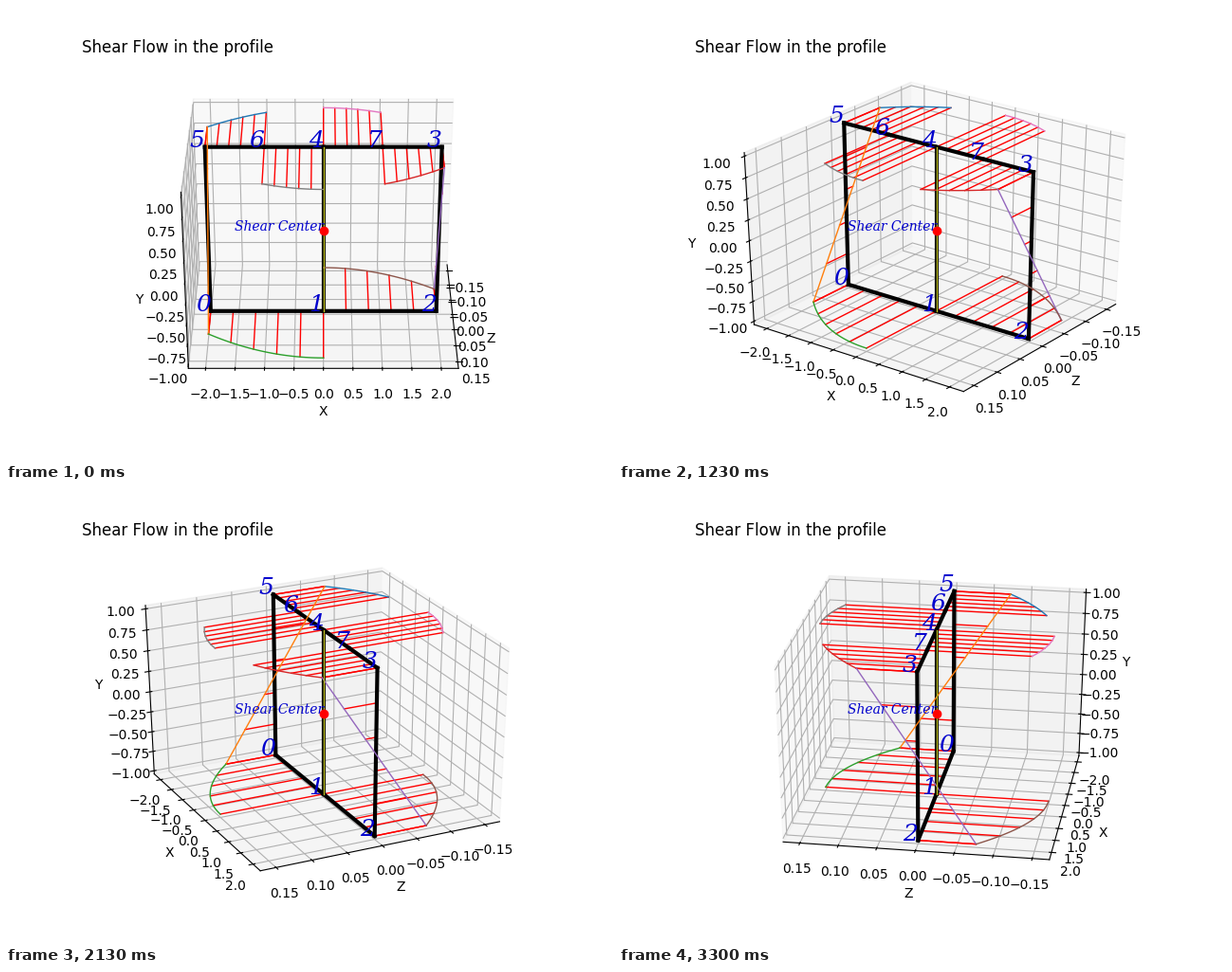
These frames come from a looping animation (640x480 px, 3330 ms). A matplotlib script:

```python
import numpy as np
import matplotlib.pyplot as plt
from matplotlib.animation import FuncAnimation

FRAMES = 111
INTERVAL = 30  # ms
Q_MAX = 0.15  # peak shear flow, S / I of the section

NODES = [(-2, -1), (0, -1), (2, -1), (2, 1), (0, 1), (-2, 1), (-1, 1), (1, 1)]


def flange(x, y):
    return Q_MAX * (1 - x**2 / 8)


def side(x, y):
    return Q_MAX / 2 * y


def web(x, y):
    return 0 * x


# start node, end node, sign of the flow, flow law
EDGES = [
    (6, 5, -1, flange),
    (5, 0, -1, side),
    (0, 1, 1, flange),
    (3, 7, 1, flange),
    (2, 3, 1, side),
    (1, 2, -1, flange),
    (7, 4, -1, flange),
    (4, 6, 1, flange),
    (1, 4, 1, web),
]

fig = plt.figure(figsize=(6.4, 4.8), dpi=100)
ax = fig.add_subplot(projection="3d")
ax.apply_aspect = lambda position=None: None  # fill the whole subplot area
ax.set_box_aspect((1, 1, 1), zoom=np.sqrt(3) / 1.8294640721620434)
fig.text(0.125, 0.8974, "Shear Flow in the profile", fontsize=12)


def flow_points(edge, count):
    start, end, sign, law = edge
    x, y = np.linspace(NODES[start], NODES[end], count).T
    return x, y, sign * law(x, y)


def draw_hatch(edge):
    x, y, q = flow_points(edge, 6)
    gap = np.full_like(x, np.nan)
    depth = np.column_stack([0 * q, q, gap]).ravel()
    ax.plot(depth, np.repeat(x, 3), np.repeat(y, 3), color="red", lw=1)


def draw_wall(edge):
    x, y = np.array([NODES[edge[0]], NODES[edge[1]]], float).T
    ax.plot(0 * x, x, y, color="black", lw=3)


def draw_curve(edge, color):
    x, y, q = flow_points(edge, 40)
    ax.plot(q, x, y, color=color, lw=1)


def label(x, y, text, size):
    ax.text(0, x, y, text, fontsize=size, color="mediumblue", ha="right",
            family="DejaVu Serif", style="italic")


for edge in EDGES:
    draw_hatch(edge)
for edge in EDGES:
    draw_wall(edge)
for i, edge in enumerate(EDGES):
    draw_curve(edge, f"C{i}")

for i, (x, y) in enumerate(NODES):
    label(x, y, str(i), 18)
label(0, 0, "Shear Center", 10)
ax.plot([0], [0], [0], "ro")

# The section's Z, X and Y run along the plot's x, y and z axes.
ax.set_xlabel("Z")
ax.set_ylabel("X")
ax.set_zlabel("Y")
ax.set_xticks(np.linspace(-0.15, 0.15, 7))
ax.set_yticks(np.linspace(-2, 2, 9))
ax.set_zticks(np.linspace(-1, 1, 9))

pad = 25 / 24
ax.set_xlim(-0.165 * pad, 0.165 * pad)
ax.set_ylim(-2.2 * pad, 2.2 * pad)
ax.set_zlim(-pad, pad)


def update(frame):
    # one degree per 1/30 s, in whole steps: 0.9 degrees per frame
    degrees = (18 * frame + 15) // 20
    # the tiny offset keeps the back panes unambiguous at 0 and 90 degrees
    ax.view_init(elev=30, azim=degrees + 1e-3)
    return ()


anim = FuncAnimation(fig, update, frames=FRAMES, init_func=lambda: update(0),
                     interval=INTERVAL, repeat=True, repeat_delay=0, blit=False)
plt.show()
```
